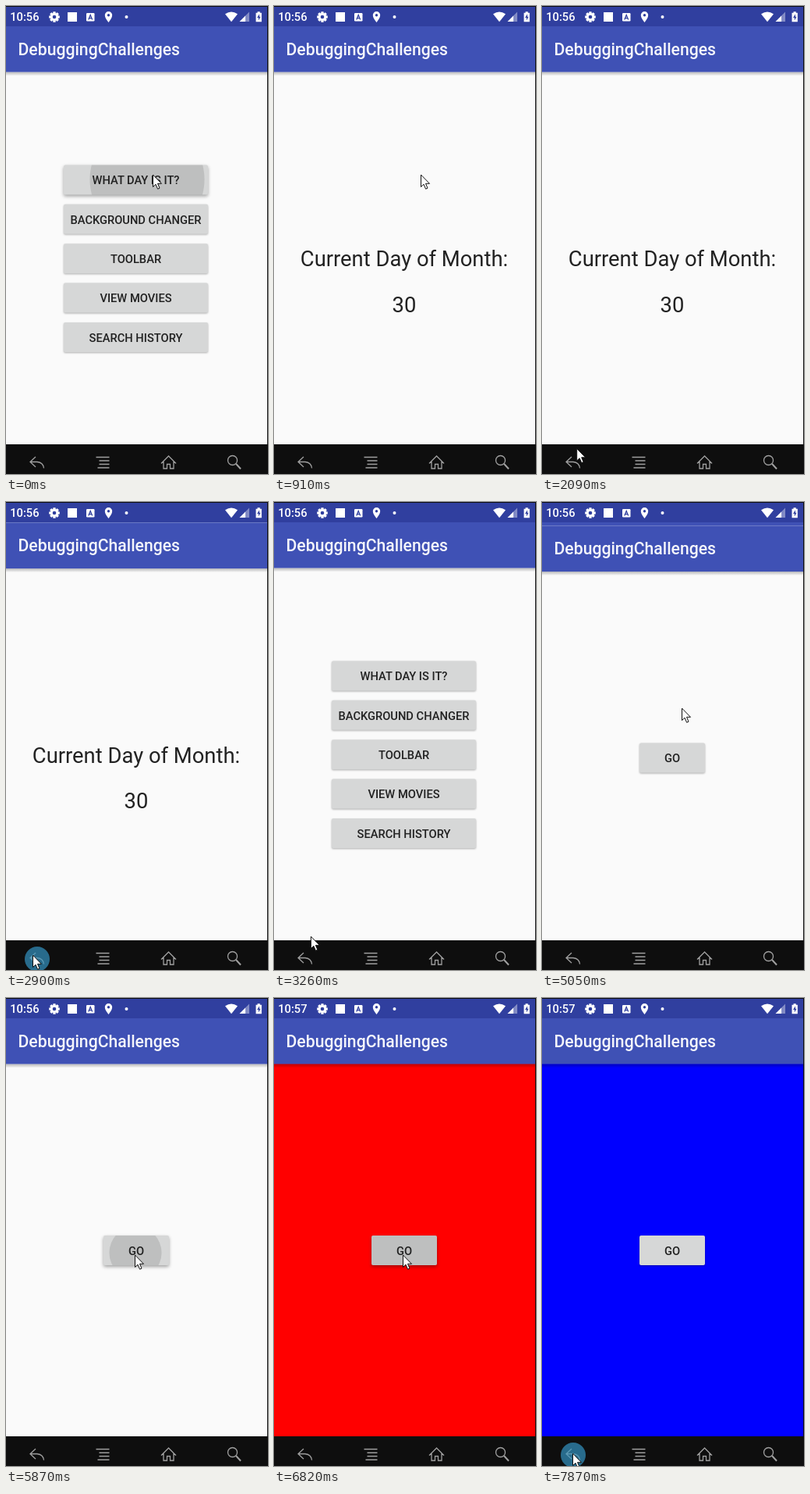
Write an HTML page that moves like this. It is 336x599 px and loops after 8000 ms.

```html
<!DOCTYPE html>
<html lang="en">
<head>
<meta charset="utf-8">
<title>Phone screen demo</title>
<style>
  html, body { margin: 0; width: 100%; height: 100%; overflow: hidden; background: #0e0e0e; }
  svg { display: block; width: 100%; height: 100%; }
  text { font-family: Roboto, sans-serif; font-weight: 500; }
  .title { font-size: 21.2px; fill: #fff; fill-opacity: .95; }
  .label { font-size: 14.7px; fill: #212121; text-anchor: middle; }
  .big { font-size: 27.4px; font-weight: 400; fill: #222; text-anchor: middle; }
  .clock { font-size: 14.7px; fill: #fff; }
  .button { filter: drop-shadow(0 1px 1px rgba(0,0,0,.3)); }
  .button.raised { filter: drop-shadow(0 2px 2px rgba(0,0,0,.36)); }
  .nav { fill: none; stroke: #a0a0a0; stroke-width: 1.3; }
</style>
</head>
<body>
<svg id="stage" viewBox="0 0 336 599"></svg>
<script>
const LOOP = 8000;
const stage = document.getElementById('stage');
const $ = id => document.getElementById(id);

const button = (id, x, y, w, label) => `
  <clipPath id="${id}-clip"><rect x="${x}" y="${y}" width="${w}" height="38" rx="2"/></clipPath>
  <g id="${id}" class="button">
    <rect x="${x}" y="${y}" width="${w}" height="38" rx="2" fill="#d6d7d7"/>
    <circle id="${id}-ripple" r="0" clip-path="url(#${id}-clip)"/>
  </g>
  <text class="label" x="${x + w / 2}" y="${y + 24.8}">${label}</text>`;

const screen = (id, body) => `
  <g id="${id}">
    <rect id="${id}-bg" y="26" width="336" height="573" fill="#fafafa"/>
    ${body}
    <rect y="84.5" width="336" height="5" fill="url(#shade)"/>
    <rect y="26" width="336" height="58.5" fill="#3f51b5"/>
    <text class="title" x="15.5" y="62.8">DebuggingChallenges</text>
  </g>`;

const labels = ['WHAT DAY IS IT?', 'BACKGROUND CHANGER', 'TOOLBAR', 'VIEW MOVIES', 'SEARCH HISTORY'];
const menu = labels.map((s, i) => button('item' + i, 74, 203.4 + 50.4 * i, 185, s)).join('');

const gear = [0, 45, 90, 135].map(a =>
  `<rect x="-1.7" y="-6.8" width="3.4" height="13.6" rx=".6" transform="rotate(${a})"/>`).join('');

const status = `
  <rect width="336" height="26" fill="#303f9f"/>
  <text id="clock" class="clock" x="5.2" y="19"></text>
  <g fill="#fff">
    <g transform="translate(62 14)">${gear}<circle r="5"/><circle r="2.3" fill="#303f9f"/></g>
    <rect x="79" y="8" width="12" height="12"/>
    <rect x="103" y="9" width="10.5" height="10.5" rx="1.2"/>
    <path d="M131.5 21C129 17.5 126.8 14.7 126.8 11.8a4.7 4.7 0 0 1 9.4 0C136.2 14.7 134 17.5 131.5 21z"/>
    <circle cx="131.5" cy="11.8" r="1.7" fill="#303f9f"/>
    <circle cx="154.5" cy="14" r="2"/>
    <path d="M289 20.2L281 10.3Q289 4.8 297 10.3z"/>
    <path d="M299.5 20H312V7.5z" fill-opacity=".4"/>
    <path d="M299.5 20H307V12.5z"/>
    <path d="M320.5 8.8H322.5V7.3H325.7V8.8H327.8V20.2H320.5z"/>
  </g>
  <path d="M105.8 17.6L108.2 11.4L110.7 17.6M106.8 15.6H109.7" fill="none" stroke="#303f9f" stroke-width="1.3"/>
  <path d="M324.9 10.3L322 15H323.8V18.6L326.5 13.8H324.9z" fill="#303f9f"/>`;

const backArrow = 'M38 577L31 583.5L38 590M31 583.5H40Q47.5 584 48.5 591.5';
const nav = `
  <rect y="561" width="336" height="38" fill="#0e0e0e"/>
  <g class="nav">
    <path d="${backArrow}"/>
    <path d="M115.5 577.5H132.5M119.5 582H132.5M119.5 586.5H132.5M117.5 591H132.5"/>
    <path d="M199 585.5L208.5 576L218 585.5M202 583V592H206.5V586.5H210.5V592H215V583"/>
    <circle cx="290.5" cy="581.5" r="6"/><path d="M295 586L301 592.5" stroke-width="2"/>
  </g>
  <g id="hover">
    <circle cx="40" cy="585" r="16" fill="#286b8c"/>
    <path class="nav" style="stroke:#5d9ab5" d="${backArrow}"/>
  </g>`;

stage.innerHTML = `
  <linearGradient id="shade" x2="0" y2="1">
    <stop stop-opacity=".26"/><stop offset="1" stop-opacity="0"/>
  </linearGradient>
  ${screen('list', menu)}
  ${screen('day', `<text class="big" x="167" y="333.4">Current Day of Month:</text>
    <text class="big" x="167" y="391.5">30</text>`)}
  ${screen('color', button('go', 125, 304, 84, 'GO'))}
  ${status}${nav}
  <path d="M0 .5H336M335.5 0V599" stroke="#0e0e0e"/>
  <path id="cursor" d="M.5 0V15.5L4 12.2L6.6 18.2L9 17.1L6.5 11.3H11.5z"
    fill="#fff" stroke="#111" stroke-linejoin="round"/>`;

const clamp = v => Math.min(1, Math.max(0, v));
const progress = (t, from, to) => clamp((t - from) / (to - from));
const easeIn = p => p * p;
const easeOut = p => 1 - (1 - p) ** 2;
const easeInOut = p => p * p * (3 - 2 * p);

// Times of the main events
const OPEN_DAY = 910, CLOSE_DAY = 2900, DAY_GONE = 3260;
const OPEN_COLOR = 4780, COLOR_READY = 5440, RED = 5990, BLUE = 6970;

const home = { x: 188, y: 216 };
const moves = [
  { from: 1200, to: 1550, x: 111, y: 478, ease: easeIn },
  { from: 1550, to: 2400, x: 34, y: 580, ease: easeOut },
  { from: 3140, to: 3500, x: 148, y: 368, ease: easeIn },
  { from: 3500, to: 3850, x: 179, y: 264, ease: easeOut },
  { from: 5080, to: 5460, x: 165, y: 329, ease: easeInOut },
  { from: 7000, to: 7330, x: 59, y: 535, ease: easeIn },
  { from: 7330, to: 7750, x: 39, y: 583, ease: easeOut }
];

// r is the ripple radius when the press becomes visible
const presses = [
  { id: 'item0', from: 0, to: OPEN_DAY, x: 181, y: 222, r: 73 },
  { id: 'item1', from: 4330, to: 4900, x: 178, y: 272, r: 60 },
  { id: 'go', from: 5870, to: 6110, x: 166, y: 326, r: 33 },
  { id: 'go', from: 6820, to: 7090, x: 166, y: 326, r: 80 }
];

function set(id, attrs) {
  for (const key in attrs) $(id).setAttribute(key, attrs[key]);
}

function drawCursor(t) {
  let { x, y } = home;
  for (const m of moves) {
    const p = m.ease(progress(t, m.from, m.to));
    x += (m.x - x) * p;
    y += (m.y - y) * p;
  }
  set('cursor', { transform: `translate(${x} ${y})` });
}

function drawPresses(t) {
  for (const id of ['item0', 'item1', 'go']) {
    const press = presses.find(p => p.id === id && t >= p.from && t < p.to);
    set(id, { class: press ? 'button raised' : 'button' });
    set(id + '-ripple', press ? {
      cx: press.x,
      cy: press.y,
      r: press.r + .55 * (t - press.from),
      opacity: .115 * clamp((press.to - t) / 150)
    } : { r: 0 });
  }
}

function drawScreens(t) {
  const leave = easeIn(progress(t, CLOSE_DAY, DAY_GONE));
  set('day', {
    transform: `translate(0 ${t < CLOSE_DAY ? 0 : .6 + 46 * leave})`,
    opacity: t < OPEN_DAY ? 0 : 1 - leave
  });
  const rise = (1 - progress(t, OPEN_COLOR, COLOR_READY)) ** 4;
  set('color', {
    transform: `translate(0 ${38 * rise})`,
    opacity: t < OPEN_COLOR ? 0 : clamp(.5 + (t - OPEN_COLOR) / 240)
  });
  set('color-bg', { fill: t < RED ? '#fafafa' : t < BLUE ? '#f00' : '#00f' });
  $('clock').textContent = t < RED ? '10:56' : '10:57';
}

const glow = (t, from) => t < from ? 0 : clamp(.6 + (t - from) / 650);

function drawHover(t) {
  const first = glow(t, 2360) * (1 - progress(t, 3020, DAY_GONE));
  set('hover', { opacity: Math.max(first, glow(t, 7600)) });
}

const start = performance.now();
function tick() {
  const t = (performance.now() - start) % LOOP;
  drawScreens(t);
  drawPresses(t);
  drawHover(t);
  drawCursor(t);
  requestAnimationFrame(tick);
}
tick();
</script>
</body>
</html>
```
